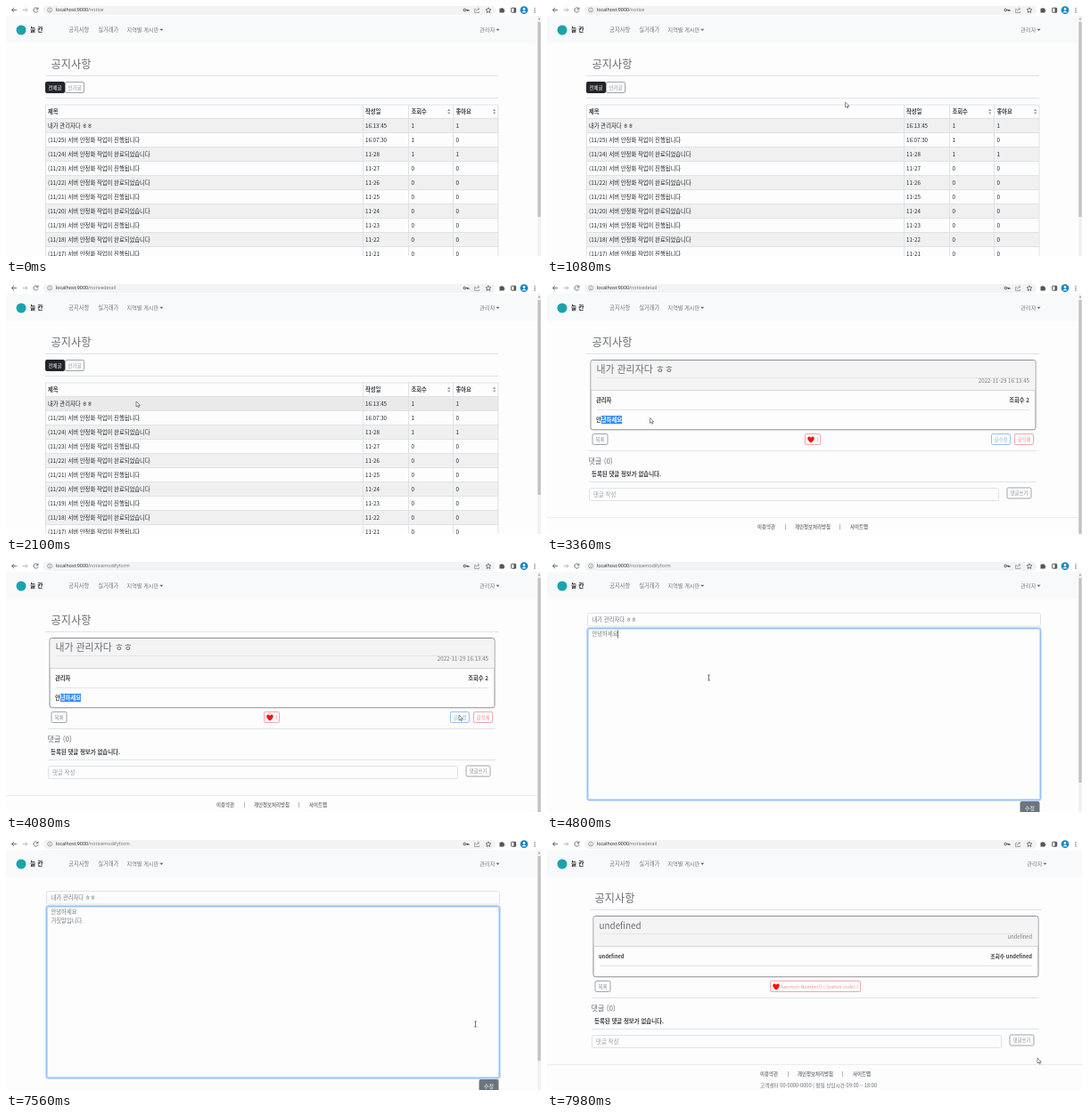
Write an HTML page that moves like this. It is 600x281 px and loops after 8000 ms.

```html
<!DOCTYPE html>
<html lang="ko">
<head>
<meta charset="utf-8">
<title>공지사항</title>
<style>
  html, body { margin: 0; width: 100%; height: 100%; overflow: hidden; background: #fdfdfe; }
  svg { display: block; width: 600px; height: 281px; font-family: "Noto Sans CJK KR", "Noto Sans CJK", "Noto Sans", sans-serif; }
  text { white-space: pre; }
  .ui { font-family: "Open Sans", sans-serif; }
</style>
</head>
<body>
<svg id="stage" viewBox="0 0 600 281"></svg>
<script>
const LOOP = 8000, TICK = 60;
const PAGE = '#fdfdfe', BORDER = '#dfe2e6', INK = '#3a3e42', GRAY = '#75797d', TITLE = '#6a6e73';
const RED = '#ee9298', BLUE = '#85b1e6', OUTLINE = '#8a8e92';

// Drawing helpers; text is placed by its vertical centre.
const text = (x, y, size, str, fill = INK, attrs = '') =>
  `<text x="${x}" y="${y + size * 0.39}" font-size="${size}" fill="${fill}" ${attrs}>${str}</text>`;
const END = 'text-anchor="end" ', MID = 'text-anchor="middle" ', BOLD = 'font-weight="700" ', LIGHT = 'font-weight="300" ';
const box = (x, y, w, h, fill, stroke = 'none', r = 0, attrs = '') =>
  `<rect x="${x}" y="${y}" width="${w}" height="${h}" rx="${r}" fill="${fill}" stroke="${stroke}" ${attrs}/>`;
const line = (x1, x2, y, color = BORDER) => `<path d="M${x1} ${y}H${x2}" stroke="${color}"/>`;
const vline = (x, y1, y2, color = BORDER) => `<path d="M${x} ${y1}V${y2}" stroke="${color}"/>`;
const stroke = (d, color = '#5f6368', w = 0.9) => `<path d="${d}" fill="none" stroke="${color}" stroke-width="${w}"/>`;
const caretDown = (x, y) => `<path d="M${x} ${y}h4l-2 2.2z" fill="#666"/>`;
const group = (id, body, attrs = '') => `<g id="${id}" ${attrs}>${body}</g>`;
const button = (x, y, w, h, label, color) =>
  box(x + 0.5, y + 0.5, w - 1, h - 1, PAGE, color, 1.5, 'stroke-width=".8"') +
  text(x + w / 2, y + h / 2, 5.5, label, color, MID);

function browserBar() {
  return box(0, 0, 600, 11, '#fff') + box(42, -1, 507, 11, '#f1f3f4', 'none', 5) +
    stroke('M12 4.5H6.5M9 2L6.5 4.5 9 7') +
    stroke('M18.5 4.5H24M21.5 2L24 4.5 21.5 7', '#b4b7ba') +
    stroke('M35.4 2.7A2.6 2.6 0 1 0 36 5.2M36 1.6V3.6H34') +
    stroke('M46.6 4.5a2.5 2.5 0 1 0 5 0a2.5 2.5 0 1 0-5 0M49.1 4.2V6M49.1 2.9V3.5', '#777', 0.6) +
    '<text class="ui" x="56" y="6.4" font-size="5.35" fill="#202124">localhost:9000<tspan id="path" fill="#6a6d70"></tspan></text>' +
    stroke('M513 4.5a1.3 1.3 0 1 0 2.6 0a1.3 1.3 0 1 0-2.6 0M515.6 4.5H519V6M517.5 4.5V5.8', '#444') +
    stroke('M527 3.5H525.5V7.5H530.5V6M527 6Q527.5 3.3 530.5 3.2M529 1.6L530.8 3.2 529 4.8', '#888', 0.7) +
    stroke('M541 1.8l.9 1.9 2 .2-1.5 1.4.4 2.1-1.8-1-1.8 1 .4-2.1-1.5-1.4 2-.2z', '#444', 0.7) +
    '<path d="M553.5 2.8h1.6a.9.9 0 1 1 1.8 0h1.6v1.7a.9.9 0 1 1 0 1.8V7.5h-5z" fill="#555"/>' +
    box(566.7, 2.2, 5, 5, 'none', '#555', 0.5) + box(569.5, 2.2, 2.2, 5, '#555') +
    '<circle cx="581" cy="4.6" r="4.4" fill="#1786c9"/><circle cx="581" cy="3.4" r="1.3" fill="#fff"/>' +
    '<path d="M578.4 7.2q2.6-3.6 5.2 0z" fill="#fff"/>' +
    [2.6, 4.8, 7].map(y => `<circle cx="593" cy="${y}" r=".7" fill="#555"/>`).join('');
}

function navbar() {
  return box(0, 11, 600, 30.5, '#f8f9fa') +
    '<circle cx="17" cy="27" r="5.5" fill="#1ba3ad"/>' +
    text(27, 26.8, 6.8, '늘 칸', '#222', BOLD) +
    text(70.3, 26.8, 6.25, '공지사항', GRAY) + text(103.3, 26.8, 6.25, '실거래가', GRAY) +
    text(135.5, 26.8, 6.15, '지역별 게시판', GRAY) + caretDown(172.3, 25.8) +
    group('user', text(531.3, 26.8, 6.2, '관리자', GRAY) + caretDown(549.5, 25.8));
}

const scrollbar = () => group('scroll', box(596, 11, 4, 270, '#f1f1f1') +
  '<path d="M596.8 15.2h2.4l-1.2-1.6z" fill="#777"/>' +
  '<rect id="thumb" x="596.4" y="18" width="3.2" fill="#c1c1c1"/>');

const heading = () => text(50.5, 65.3, 12.2, '공지사항', TITLE, LIGHT) + line(44, 552, 78.5);

const rowTop = i => 126.5 + 16 * i;

function listPage() {
  const sortIcon = x => `<path d="M${x} 118h3.4l-1.7-2.4zM${x} 119.4h3.4l-1.7 2.4z" fill="#999"/>`;
  const dark = '#212529';
  let out = heading() + box(44, 85, 22, 13, dark, 'none', 2) +
    text(55, 91.5, 5.5, '전체글', '#fff', MID) + button(66, 85, 22, 13, '인기글', OUTLINE) + line(44, 552, 103.5);
  for (let i = 0; i < 10; i += 2) out += box(44, rowTop(i), 508, 16, '#f0f0f0');
  out += '<rect id="hover" x="44" width="508" height="16" fill="#eaeaea"/>';
  ['제목', '작성일', '조회수', '좋아요'].forEach((h, i) =>
    out += text([47, 403, 454.5, 504.5][i], 118.5, 6.3, h, INK, BOLD));
  out += sortIcon(495) + sortIcon(546) + line(44, 552, 111);
  for (let i = 0; i < 10; i++) {
    const y = rowTop(i) + 8, done = i % 2 === 0;
    const title = i ? `(11/${26 - i}) 서버 안정화 작업이 ${done ? '완료되었습니다' : '진행됩니다'}` : '내가 관리자다 ㅎㅎ';
    const date = ['16:13:45', '16:07:30'][i] || `11-${30 - i}`;
    out += line(44, 552, rowTop(i)) + text(47, y, 6.3, title, dark) + text(403, y, 6.2, date, dark) +
      text(454.5, y, 6.3, i < 3 ? 1 : 0, dark) + text(504.5, y, 6.3, done && i < 3 ? 1 : 0, dark);
  }
  return out + [44.5, 400.5, 451.5, 501.5, 552].map(x => vline(x, 111, 281)).join('');
}

const heart = (x, y) =>
  `<path transform="translate(${x} ${y})" d="M0 3.7C-7-1-2.5-5.5 0-2C2.5-5.5 7-1 0 3.7z" fill="#f01414"/>`;

function detailPage(loaded) {
  const up = loaded ? 0 : -10;
  const head = loaded
    ? text(55.5, 96, 10.9, '내가 관리자다 ㅎㅎ', TITLE, LIGHT) +
      text(541, 109, 6.15, '2022-11-29 16:13:45', GRAY, END) +
      text(55, 130.3, 6.3, '관리자', INK, BOLD) + text(541, 130.3, 6.3, '조회수 2', INK, BOLD + END)
    : text(55.5, 96, 9.9, 'undefined', TITLE, LIGHT) + text(541, 109, 5.7, 'undefined', GRAY, END) +
      text(55, 130.3, 5.65, 'undefined', INK, BOLD) + text(541, 130.3, 5.8, '조회수 undefined', INK, BOLD + END);
  const body = loaded
    ? text(55, 153, 6.3, '안녕하세요', INK, BOLD) +
      '<clipPath id="selClip"><rect id="selArea" x="60.8" y="148" height="9.5"/></clipPath>' +
      `<g clip-path="url(#selClip)">${box(60.8, 148, 23.3, 9.5, '#2f8cf5')}${text(55, 153, 6.3, '안녕하세요', '#fff', BOLD)}</g>`
    : '';
  const actions = loaded
    ? button(289, 168, 18, 13, '', RED) + heart(296, 174.8) + text(301.8, 174.7, 5.5, '1', RED) +
      button(498, 168, 22, 13, '글수정', BLUE) + button(524, 168, 22, 13, '글삭제', RED)
    : button(247, 168, 102, 13, '', RED) + heart(254, 174.8) +
      text(259, 174.5, 5.35, 'function Number() { [native code] }', RED);
  const footer = (x, label) => text(x, 272.7, 5.45, label, GRAY, BOLD);
  return heading() + box(49, 85.5, 499, 78.3 + up, PAGE, OUTLINE, 2.5) +
    box(49.5, 86, 498, 33.2, '#f4f4f5', 'none', 2) + line(49.5, 547.5, 119.5, '#d6d6d7') +
    line(56, 541, 105.5, '#e4e4e5') + line(56, 541, 141.5, '#e4e4e5') + head + body +
    group('', button(50.5, 168, 18, 13, '목록', OUTLINE) + actions + line(47, 549, 187.5) +
      text(46.5, 199, 8.1, '댓글 (0)', TITLE, LIGHT) +
      text(50, 214, 6.4, '등록된 댓글 정보가 없습니다.', INK, BOLD) + line(47, 549, 222.5) +
      box(47.5, 229.5, 459, 14, PAGE, BORDER, 2) + text(52, 236.5, 6.4, '댓글 작성', '#999da1') +
      button(515.5, 228.5, 28, 13, '댓글쓰기', OUTLINE) + line(-3, 600, 262.5, '#ebecee') +
      footer(236, '이용약관') + footer(266.5, '|') + footer(278, '개인정보처리방침') +
      footer(327.5, '|') + footer(340, '사이트맵') +
      text(236, 285.7, 5.65, '고객센터 00-0000-0000 | 평일 상담시간 09:00 ~ 18:00', '#63676b'),
      `transform="translate(0 ${up})"`);
}

function formPage() {
  return box(45.5, 57.5, 508, 14.5, PAGE, BORDER, 2) + text(50.5, 65, 6.3, '내가 관리자다 ㅎㅎ', GRAY) +
    box(45.5, 74.5, 508, 193, PAGE, '#d3d7dc', 2) +
    group('focus', box(45.5, 74.5, 508, 193, 'none', '#c9defd', 2.5, 'stroke-width="3"') +
      box(45.5, 74.5, 508, 193, 'none', '#98c1f6', 2)) +
    text(50.5, 81, 6.3, '안녕하세요', GRAY) + text(50.5, 90.5, 6.3, '', GRAY, 'id="typed"') +
    '<path id="compose" stroke="#555" stroke-width=".6"/><path id="caret" stroke="#333" stroke-width=".7"/>' +
    box(530.5, 269, 22, 14, '#6c757d', 'none', 2) + text(541.5, 276.3, 6, '수정', '#fff', MID);
}

const $ = id => document.getElementById(id);
$('stage').innerHTML = box(0, 0, 600, 281, PAGE) +
  group('list', listPage()) + group('detail', detailPage(true)) +
  group('blank', detailPage(false), 'transform="translate(3 0)"') + group('form', formPage()) +
  navbar() + browserBar() + scrollbar() +
  group('arrow', '<path d="M0 0V6L1.5 4.7 2.4 6.8 3.4 6.4 2.5 4.4H4.4z" fill="#fff" stroke="#444" stroke-width=".6"/>') +
  group('beam', stroke('M-1.3-3H1.3M0-3V3M-1.3 3H1.3', '#444', 0.7));

// Step tables: the last entry whose time has passed is current.
const scenes = [[0, 'list'], [2160, 'blank'], [2280, 'detail'], [4140, 'form'], [7860, 'blank']];
const paths = [[0, '/notice'], [2100, '/noticedetail'], [4080, '/noticemodifyform'], [7800, '/noticedetail']];
const typing = [[0, ''], [5220, 'ㄱ'], [5340, '거'], [5580, '거ㅈ'], [5640, '거지'], [5700, '거짓'], [5760, '거짓ㅁ'],
  [5820, '거짓마'], [5880, '거짓말'], [5940, '거짓말ㅇ'], [6000, '거짓말이'], [6060, '거짓말입'], [6120, '거짓말입ㄴ'],
  [6180, '거짓말입니'], [6300, '거짓말입니ㄷ'], [6480, '거짓말입니다'], [6540, '거짓말입니다.']];
const thumbs = { list: 219, detail: 263, form: 230 };
const at = (steps, t) => steps.filter(s => s[0] <= t).pop()[1];

// Pointer stops: time, x, y.
const stops = [[60, 420, 248], [780, 331, 73], [1020, 331, 73], [1080, 334.5, 108], [1200, 345, 268], [1680, 345, 268],
  [2040, 146, 132], [2520, 146, 132], [2820, 61, 152], [3300, 115.5, 150.5], [3360, 115.5, 150.5], [3900, 508, 172],
  [4200, 508, 172], [4500, 181.5, 130], [6900, 181.5, 130], [7200, 512, 141], [7380, 512, 141], [7740, 541, 273],
  [7860, 541, 273], [7980, 550, 245]];

function pointer(t) {
  const i = stops.findIndex(s => s[0] > t);
  if (i < 1) return stops[i < 0 ? stops.length - 1 : 0].slice(1);
  const [t0, x0, y0] = stops[i - 1], [t1, x1, y1] = stops[i];
  const k = (t - t0) / (t1 - t0), e = k * k * (3 - 2 * k);
  return [x0 + (x1 - x0) * e, y0 + (y1 - y0) * e];
}

const show = (id, on) => $(id).setAttribute('display', on ? 'inline' : 'none');

function render(t) {
  const scene = at(scenes, t), [x, y] = pointer(t);
  ['list', 'detail', 'blank', 'form'].forEach(id => show(id, id === scene));
  $('path').textContent = at(paths, t);
  show('scroll', scene !== 'blank');
  $('thumb').setAttribute('height', thumbs[scene] || 0);
  $('user').setAttribute('transform', `translate(${scene === 'blank' ? 7 : 0} 0)`);

  const row = Math.floor((y - rowTop(0)) / 16);
  show('hover', t >= 60 && row >= 0);
  $('hover').setAttribute('y', rowTop(Math.max(row, 0)));
  $('selArea').setAttribute('width', t < 2820 ? 0 : Math.min(23.3, Math.max(0, x - 60.8)));

  const word = at(typing, t), chars = word.length, composing = chars > 0 && t < 6540;
  const focused = scene === 'form' && t >= 4500;
  show('focus', focused);
  $('typed').textContent = word;
  const edge = n => 50.5 + n * 5.8;
  show('compose', composing);
  $('compose').setAttribute('d', `M${edge(chars - 1)} 94.8H${edge(chars)}`);
  const second = t >= 5040, cx = second ? edge(chars) - (t >= 6540 ? 3.8 : 0) : edge(5);
  show('caret', focused && (composing || t % 1000 < 500 || t >= 4800 && t < 5220));
  $('caret').setAttribute('d', `M${cx} ${second ? 86 : 76.5}v9`);

  const inText = scene === 'form' && y > 75 && y < 267 || scene === 'detail' && t >= 2760 && t < 3240;
  show('arrow', t >= 60 && !inText);
  show('beam', inText);
  ['arrow', 'beam'].forEach(id => $(id).setAttribute('transform', `translate(${x} ${y})`));
}

function tick() {
  const t = performance.now() % LOOP;
  render(Math.floor(t / TICK) * TICK);
  requestAnimationFrame(tick);
}
tick();
</script>
</body>
</html>
```
